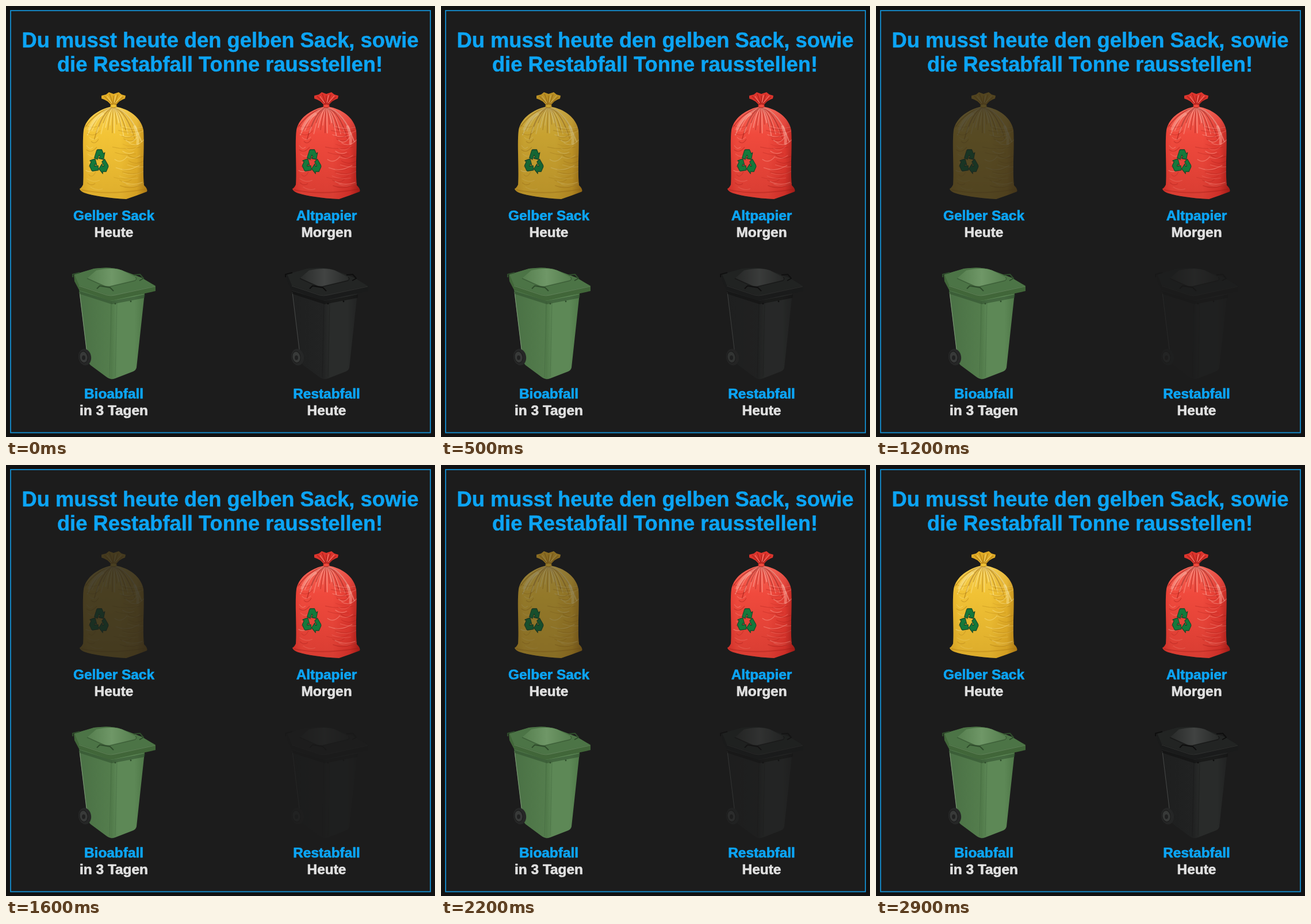
Write an HTML page that moves like this. It is 746 by 750 pixels and loops after 3000 ms.

```html
<!DOCTYPE html>
<html lang="de">
<head>
<meta charset="utf-8">
<style>
  html, body { margin: 0; height: 100%; overflow: hidden; background: #111; }
  svg { display: block; }
  text {
    font: bold 24.4px "Liberation Sans", Arial, sans-serif;
    text-anchor: middle; stroke-width: .7; stroke-linejoin: round;
  }
  .title { font-size: 36.3px; stroke-width: .5; }
  .blue { fill: #0ca4f4; stroke: #0ca4f4; }
  .white { fill: #e0e0e0; stroke: #e0e0e0; }
</style>
</head>
<body>
<svg id="stage" width="746" height="750" viewBox="0 0 746 750"></svg>
<script>
const PERIOD = 3000, STEP = 100, MIN_OPACITY = 0.2;

const yellow = { id: 'yellow', light: '#ffeb9e', main: '#f3c436', mid: '#e2ad27', dark: '#a87413' };
const red = { id: 'red', light: '#ffb3a4', main: '#f04a3d', mid: '#dd352d', dark: '#9c1a16' };
const green = {
  id: 'green', lid: '#4c7446', panel: '#557e4e', shine: '#6f9767', rim: '#416639', left: '#4a7145',
  leftEnd: '#547d4d', right: '#5d8856', rightEnd: '#4f7848', line: '#2f4d2c', edge: '#7f9b78'
};
const black = {
  id: 'black', lid: '#232524', panel: '#292b2a', shine: '#424443', rim: '#1a1b1b', left: '#1f2020',
  leftEnd: '#222323', right: '#2a2c2b', rightEnd: '#222323', line: '#0e0e0e', edge: '#484a49'
};

function randomizer(seed) {
  return () => (seed = (seed * 16807) % 2147483647) / 2147483647;
}

function gradient(id, stops, direction = '') {
  const parts = stops.map(([offset, color]) => `<stop offset="${offset}" stop-color="${color}"/>`);
  return `<linearGradient id="${id}" ${direction}>${parts.join('')}</linearGradient>`;
}

function folds(c) {
  const random = randomizer(71);
  let out = '';
  const crease = (d, light, width, opacity) =>
    out += `<path d="${d}" stroke="${light ? c.light : c.dark}" stroke-width="${width}" opacity="${opacity}"/>`;
  // Pleats fanning out below the knot
  for (let i = 0; i < 26; i++) {
    const spread = -49 + i * 3.9, drop = 196 + random() * 26 + Math.abs(spread) * .3;
    crease(`M${187 + spread * .06} 177Q${187 + spread * .6} 183 ${187 + spread} ${drop}`,
      i % 2, 1 + random(), .35 + random() * .3);
  }
  // Wrinkles running towards both sides
  for (let i = 0; i < 46; i++) {
    const y = 207 + i * 2.4, right = i % 3;
    const x = right ? 184 + random() * 30 : 137 + random() * 12;
    const length = right ? 18 + random() * 32 : 8 + random() * 18;
    crease(`M${x} ${y}q${length / 2} ${9 - random() * 3} ${length} ${(random() - .6) * 9}`,
      i % 2, .7 + random() * .9, .2 + random() * .25);
  }
  return out;
}

const arrow = 'M-11-8L-6-20Q-5-22-3-22H6L10-15L13-17L10-5L-1-7L2-10L0-13L-4-5Z';

function sack(c) {
  const body = `M184 175C160 180 139 195 135 216C132 240 136 285 134 311Q131 317 128 318
    Q129 322 136 325Q160 333 209 336Q227 330 245 323Q247 319 240 312C237 285 241 245 239 216
    C235 194 214 179 190 175Z`;
  return `
    <defs>
      ${gradient(c.id, [[0, c.mid], [.14, c.main], [.6, c.main], [.85, c.mid], [1, c.dark]])}
      ${gradient(c.id + 'Shade', [[0, c.light], [.3, c.main], [1, c.dark]], 'x1="0" y1="0" x2="0" y2="1"')}
      <clipPath id="${c.id}Clip"><path d="${body}"/></clipPath>
    </defs>
    <path d="${body}" fill="url(#${c.id})"/>
    <path d="${body}" fill="url(#${c.id}Shade)" opacity=".28"/>
    <g clip-path="url(#${c.id}Clip)" fill="none" stroke-linecap="round">
      ${folds(c)}
      <path d="M145 214Q153 195 168 188M224 210Q231 228 229 239" stroke="${c.light}" stroke-width="5" opacity=".45"/>
      <path d="M132 320Q175 330 242 319" stroke="${c.dark}" stroke-width="2" opacity=".35"/>
    </g>
    <path d="M183 173Q177 164 166 161L166 156L174 154L179 150L187 153L196 150L201 154L208 156
      L207 161Q197 164 191 173Z" fill="${c.mid}"/>
    <path d="M185 171L171 157M186 170L180 153M187 170V156M189 170L195 154M190 171L204 158"
      fill="none" stroke="${c.dark}" stroke-width="1.3" opacity=".7"/>
    <path d="M184 169L176 157M188 168L191 155M190 169L201 156" fill="none" stroke="${c.light}" opacity=".7"/>
    <ellipse cx="187" cy="174" rx="5.5" ry="3" fill="${c.main}" stroke="${c.dark}" stroke-width=".8"/>
    <g transform="translate(162 272) scale(.76 1)" fill="#14793b" stroke="#17482a" stroke-width="1.3" stroke-linejoin="round">
      ${[0, 120, 240].map(a => `<path d="${arrow}" transform="rotate(${a})"/>`).join('')}
    </g>`;
}

function bin(c) {
  return `
    <defs>
      ${gradient(c.id + 'Left', [[0, c.left], [1, c.leftEnd]])}
      ${gradient(c.id + 'Right', [[0, c.rightEnd], [.2, c.right], [.7, c.right], [1, c.rightEnd]])}
      ${gradient(c.id + 'Lid', [[0, c.panel], [.5, c.shine], [1, c.panel]])}
    </defs>
    <path d="M127 494L184 510V649Q179 649 174 645L147 625Q143 621 142 614Z" fill="url(#${c.id}Left)"/>
    <path d="M182 510L241 500L227 629Q226 634 221 636L190 648Q185 650 182 649Z" fill="url(#${c.id}Right)"/>
    <path d="M128 498L142 614" stroke="${c.edge}" fill="none"/>
    <path d="M183 515L180 646M193 516L190 645" stroke="${c.line}" opacity=".25" fill="none"/>
    <path d="M127 496L184 513L242 502L241 508L184 519L128 501Z" fill="${c.line}" opacity=".55"/>
    <path d="M118 468L153 457Q182 453 199 459L236 473L260 487V496L187 512Q181 513 176 511L127 494L119 479Z" fill="${c.rim}"/>
    <path d="M119 467L153 457Q182 453 199 459L236 473L259 487L189 503Q181 504 175 502L127 486Z" fill="${c.lid}"/>
    <path d="M141 474L157 460Q184 454 202 460L225 472Q229 475 224 478L181 488Q174 489 168 486Z"
      fill="url(#${c.id}Lid)"/>
    <path d="M141 474L168 486Q174 489 181 488L224 478Q229 475 225 472" fill="none"
      stroke="${c.line}" stroke-width="1.5" opacity=".6"/>
    <path d="M127 487L175 503Q182 505 190 503L259 488" fill="none" stroke="${c.edge}" opacity=".5"/>
    <path d="M116 472V467L128 464M158 492L163 487L181 490L187 496M222 468L233 467L239 474L232 478"
      fill="none" stroke="${c.line}" stroke-width="2" stroke-linejoin="round"/>
    <g fill="${c.line}"><circle cx="190" cy="518" r="1.4"/><circle cx="217" cy="514" r="1.4"/></g>
    <ellipse cx="137" cy="611" rx="11" ry="14.5" fill="#262727" transform="rotate(-10 137 611)"/>
    <ellipse cx="135" cy="611" rx="7" ry="10" fill="#383a39" stroke="#1b1b1b" transform="rotate(-10 135 611)"/>
    <ellipse cx="135" cy="612" rx="3" ry="4" fill="#202121"/>`;
}

const text = (x, y, style, content) => `<text x="${x}" y="${y}" class="${style}">${content}</text>`;

const item = (column, baseline, picture, name, day, due) => `
  <g transform="translate(${column * 370})">
    <g class="${due ? 'due' : ''}">${picture}</g>
    ${text(187.5, baseline, 'blue', name)}
    ${text(187.5, baseline + 29, 'white', day)}
  </g>`;

document.getElementById('stage').innerHTML = `
  <rect x="8" y="8" width="730" height="734.5" fill="#1c1c1c" stroke="#1590d2" stroke-width="1.8"/>
  ${text(372.5, 72, 'title blue', 'Du musst heute den gelben Sack, sowie')}
  ${text(372, 113.5, 'title blue', 'die Restabfall Tonne rausstellen!')}
  ${item(0, 373, sack(yellow), 'Gelber Sack', 'Heute', true)}
  ${item(1, 373, sack(red), 'Altpapier', 'Morgen', false)}
  ${item(0, 683, bin(green), 'Bioabfall', 'in 3 Tagen', false)}
  ${item(1, 683, bin(black), 'Restabfall', 'Heute', true)}`;

const due = document.querySelectorAll('.due');

function draw() {
  const time = Math.floor(performance.now() % PERIOD / STEP) * STEP;
  const wave = (1 + Math.cos(time / PERIOD * 2 * Math.PI)) / 2;
  for (const picture of due) picture.style.opacity = MIN_OPACITY + (1 - MIN_OPACITY) * wave;
  requestAnimationFrame(draw);
}
draw();
</script>
</body>
</html>
```
